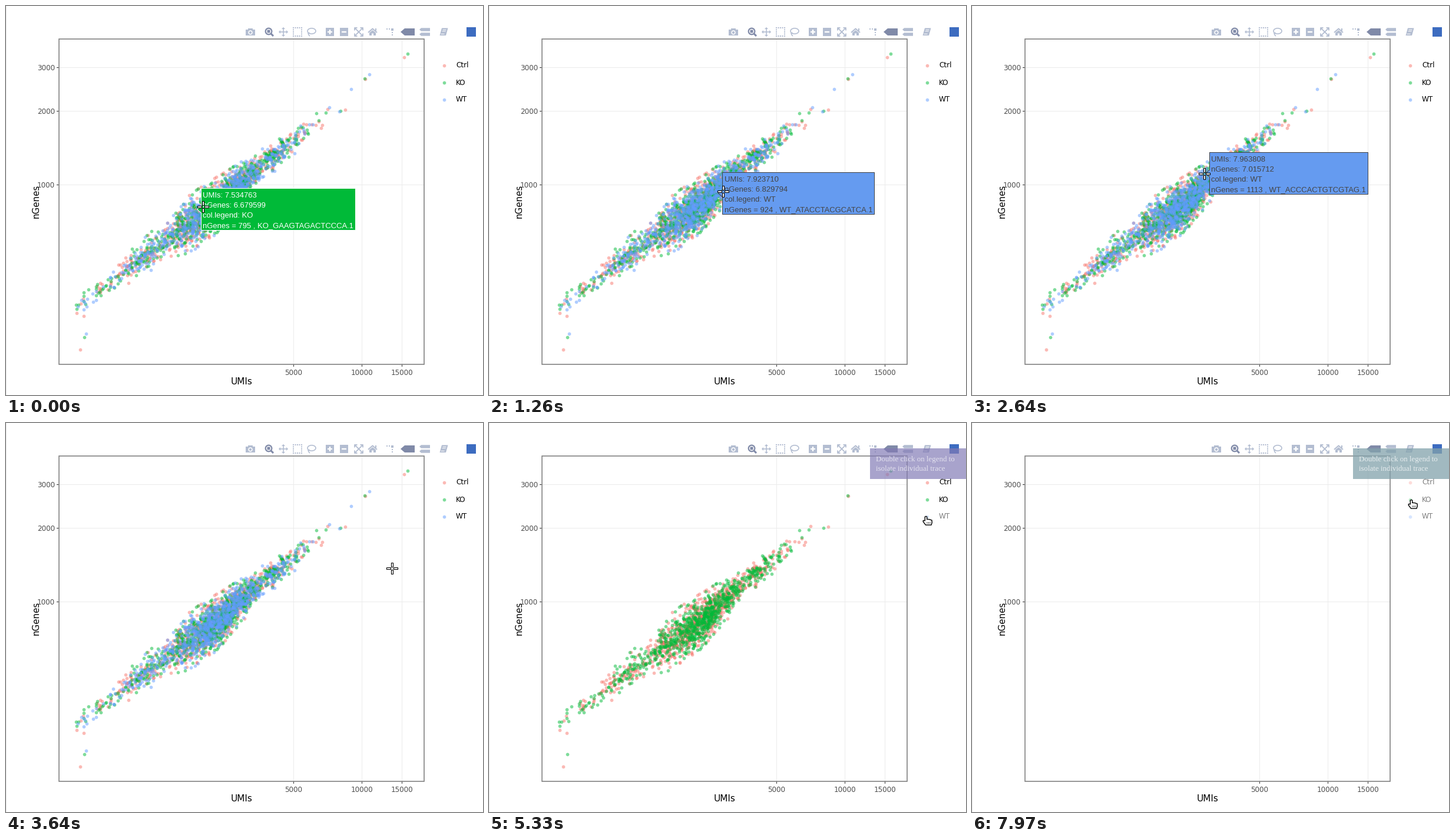
Recreate the animation shown at these times as a matplotlib script. Size 810 by 660 pixels, loop 8 s.

```python
import random

import matplotlib.pyplot as plt
import numpy as np
from matplotlib.animation import FuncAnimation
from matplotlib.patches import Circle, Ellipse, Polygon, Rectangle
from matplotlib.transforms import Affine2D

W, H, DPI = 810, 660, 80
PX = 72 / DPI
STEP, LOOP = 40, 8000
LIGHT, DARK = "#b3bdd1", "#808aa8"
COLORS = {"Ctrl": "#F8766D", "KO": "#00BA38", "WT": "#619CFF"}
HIDE_AT = {"Ctrl": 7250, "KO": 6320, "WT": 4960}

plt.rcParams["path.snap"] = False
fig = plt.figure(figsize=(W / DPI, H / DPI), dpi=DPI, facecolor="white")
ax = fig.add_axes([0, 0, 1, 1])
ax.set_xlim(0, W)
ax.set_ylim(H, 0)
ax.axis("off")


# ---------- drawing helpers (pixel units, y down) ----------
def poly(pts, color, z=3, **kw):
    return ax.add_patch(Polygon(pts, closed=True, fc=color, zorder=z, **{"lw": 0, **kw}))


def box(x, y, w, h, color, z=3, **kw):
    return ax.add_patch(Rectangle((x, y), w, h, fc=color, zorder=z, **{"lw": 0, **kw}))


def disc(x, y, r, color, **kw):
    return ax.add_patch(Circle((x, y), r, fc=color, zorder=3, **{"lw": 0, **kw}))


def stroke(pts, color, w=1, z=3, **kw):
    x, y = zip(*pts)
    return ax.plot(x, y, color=color, lw=w * PX, zorder=z, solid_capstyle="butt", **kw)[0]


def label(x, y, s, size, color, font="DejaVu Sans", z=3, **kw):
    return ax.text(x, y, s, fontsize=size * PX, color=color, family=font, zorder=z, **kw)


# ---------- log-log panel ----------
X0, Y0, KX, KY = 488.5, 303.5, 167.4, 180.7


def to_px(umis, genes):
    return X0 + np.log(umis / 5000) * KX, Y0 - np.log(genes / 1000) * KY


def to_counts(x, y):
    return int(5000 * np.exp((x - X0) / KX)), int(1000 * np.exp((Y0 - y) / KY))


stroke([(0.5, 0), (0.5, H)], "#ececec", z=1)
for n in (5000, 10000, 15000):
    x = np.floor(to_px(n, 1)[0]) + 0.5
    stroke([(x, 56), (x, 608)], "#EBEBEB", z=1)
    stroke([(x, 608), (x, 612)], "#333333")
    label(x, 626, str(n), 12, "#4D4D4D", ha="center")
for n in (1000, 2000, 3000):
    y = np.floor(to_px(1, n)[1]) + 0.5
    stroke([(90, y), (710, y)], "#EBEBEB", z=1)
    stroke([(86, y), (90, y)], "#333333")
    label(83, y + 4.5, str(n), 12, "#4D4D4D", ha="right")
box(90, 56, 620, 552, "none", ec="#7f7f7f", lw=1.6 * PX)
label(400, 642, "UMIs", 15.3, "black", ha="center")
label(56, 331, "nGenes", 15, "black", rotation=90, rotation_mode="anchor", ha="center")

# ---------- points: seeded cloud plus the loners at both ends ----------
LONERS = {
    "Ctrl": [(676, 87), (610, 124), (576, 176), (126, 583)],
    "KO": [(682, 81), (609, 123), (568, 178), (133, 562)],
    "WT": [(617, 116), (586, 141), (566, 179), (136, 556)],
}


def cloud(rng):
    x = np.concatenate([rng.normal(358, 42, 680), rng.normal(235, 40, 105),
                        440 + rng.exponential(33, 70), rng.uniform(118, 160, 9)])
    x = x[(x > 118) & (x < 550)]
    d = x - 355
    trend = 331 - 0.77 * d + 8 * np.exp(-(d / 55) ** 2)
    spread = 9 + 10 * np.exp(-((x - 332) / 85) ** 2)
    return x, trend + spread * np.clip(rng.normal(size=x.size), -2.6, 2.6)


dots, keys, names = {}, {}, {}
rng = np.random.default_rng(11)
dot = dict(ls="", marker="o", ms=5.7 * PX, mew=0)
for i, (name, color) in enumerate(COLORS.items()):
    lx, ly = zip(*LONERS[name])
    cx, cy = cloud(rng)
    dots[name], = ax.plot([*cx, *lx], [*cy, *ly], color=color, alpha=0.5,
                          zorder=2 + i / 10, **dot)
    y = 100.5 + 29 * i
    keys[name], = ax.plot([744], [y], color=color, **dot)
    names[name] = label(764, y + 4, name, 12, "black")


# ---------- toolbar ----------
def toolbar():
    # camera
    box(407, 40, 16, 10, LIGHT)
    box(411, 38, 8, 3, LIGHT)
    disc(415, 45, 3.7, "white")
    disc(415, 45, 2.2, LIGHT)
    # zoom
    disc(446, 43, 5.3, "none", ec=DARK, lw=2.2 * PX)
    stroke([(449.5, 46.5), (454, 51)], DARK, 3)
    box(443.5, 40.5, 5, 5, DARK)
    # pan
    stroke([(464, 44), (478, 44)], LIGHT, 1.6)
    stroke([(471, 37), (471, 51)], LIGHT, 1.6)
    for dx, dy in ((1, 0), (-1, 0), (0, 1), (0, -1)):
        poly([(471 + 8 * dx, 44 + 8 * dy), (471 + 5 * dx + 3 * dy, 44 + 5 * dy + 3 * dx),
              (471 + 5 * dx - 3 * dy, 44 + 5 * dy - 3 * dx)], LIGHT)
    # box select
    for k in range(5):
        a = 3.5 * k
        for x, y in ((0, a), (14, a), (a, 0), (a, 14)):
            box(487 + x, 36 + y, 2, 2, LIGHT)
    # lasso
    ax.add_patch(Ellipse((519, 42.5), 14, 9.5, fc="none", ec=LIGHT, lw=1.6 * PX, zorder=3))
    stroke([(516, 46), (513, 46), (514, 49), (516, 51)], LIGHT, 1.6)
    # zoom in and out
    for x in (543, 567):
        box(x, 37, 14, 14, LIGHT)
        stroke([(x + 3, 44), (x + 11, 44)], "white", 2.4)
    stroke([(550, 40), (550, 48)], "white", 2.4)
    # autoscale
    for s in (-1, 1):
        stroke([(593, 44 - 6 * s), (605, 44 + 6 * s)], LIGHT, 1.8)
        for q in (-1, 1):
            stroke([(599 + 7 * s, 44 + 2.5 * q), (599 + 7 * s, 44 + 7 * q),
                    (599 + 2.5 * s, 44 + 7 * q)], LIGHT, 1.8)
    # home
    stroke([(615, 45), (622.5, 38.5), (630, 45)], LIGHT, 2)
    box(627, 38, 2, 4, LIGHT)
    poly([(617, 45.5), (622.5, 41), (628, 45.5), (628, 50), (617, 50)], LIGHT)
    box(621, 46.5, 3, 3.5, "white")
    # spike lines
    for x, y, s in ((646, 38, 2), (650, 38, 2), (654, 38, 4), (655, 44, 2), (655, 48, 2)):
        box(x, y, s, s, LIGHT)
    # hover modes
    poly([(670, 44), (677, 38), (694, 38), (694, 50), (677, 50)], DARK)
    for y in (40, 48):
        poly([(702, y), (705, y - 2.7), (720, y - 2.7), (720, y + 2.7), (705, y + 2.7)], LIGHT)
    # book
    poly([(740, 37.5), (750.5, 37.5), (747, 50), (736.5, 50)], LIGHT)
    for x, y in ((741.5, 40.5), (740.7, 43), (738.5, 47.5)):
        stroke([(x, y), (x + 6, y)], "white")
    box(782, 36, 16, 16, "#3d6cc0")


toolbar()

# ---------- cursor: each move as start, end, x, y ----------
MOVES = [
    (0, 1, 335, 341), (40, 230, 367, 334), (630, 1430, 407, 310), (1470, 1800, 428, 300),
    (1800, 2110, 400, 291), (2250, 2310, 410, 288), (2600, 2640, 395, 285),
    (2950, 3660, 656, 247), (3660, 3740, 723, 222), (3790, 4110, 742, 158),
    (5480, 5700, 746, 131), (6330, 6470, 746, 105), (6760, 6880, 744, 101),
    (7240, 7450, 746, 112), (7700, 7900, 746, 130),
]


def cursor_at(t):
    pos = np.array(MOVES[0][2:], float)
    for start, end, x, y in MOVES:
        pos += np.clip((t - start) / (end - start), 0, 1) * ((x, y) - pos)
    return np.round(pos)


move = Affine2D()
on_cursor = dict(transform=move + ax.transData)
edge = dict(ec="black", lw=1.1 * PX, **on_cursor)
palm = [(-1.7, 8), (-1.7, 1.2), (0, 0.3), (1.7, 1.2), (1.7, 5.3), (6, 5.6), (10, 7),
        (10.3, 11), (9, 15), (-0.5, 15), (-4.7, 9.5), (-4.7, 7.6), (-3.4, 7.4)]
CURSORS = {
    "cross": [box(x, y, w, h, "white", z=7, **edge) for x, y, w, h in
              ((-9.5, -1.5, 7, 3), (2.5, -1.5, 7, 3), (-1.5, -9.5, 3, 7), (-1.5, 2.5, 3, 7))],
    "arrow": [poly([(0.5, 0.5), (0.5, 16), (4, 12.7), (6.3, 18), (8.6, 17), (6.3, 12),
                    (11, 12)], "white", z=7, **edge)],
    "hand": [poly(palm, "white", z=7, **{**edge, "lw": 1.4 * PX})]
            + [stroke([(x, 10.5), (x, 12.5)], "black", z=7, **on_cursor) for x in (2, 4.5, 7)],
}


def draw_cursor(t):
    x, y = cursor_at(t)
    move.clear().translate(x, y)
    kind = "cross" if x < 710 else "arrow" if t < 4060 else "hand"
    for name, parts in CURSORS.items():
        for a in parts:
            a.set_visible(name == kind)


# ---------- hover label: start, end, trace, UMIs, genes, cell code ----------
CELLS = [
    (0, 40, "KO", 1871, 795, "GAAGTAGACTCCCA"),
    (1240, 1300, "WT", 2761, 924, "ATACCTACGCATCA"),
    (2300, 3000, "WT", 2874, 1113, "ACCCACTGTCGTAG"),
]
tip_move = Affine2D()
on_tip = dict(transform=tip_move + ax.transData)
tip_box = poly([(0, 0), (1, 0), (1, 1)], "white", z=5, lw=PX, **on_tip)
tip_text = [label(10, 17 * k - 20, "", 13, "white", "Liberation Sans", z=5, **on_tip)
            for k in range(4)]


def hovered(t):
    for start, end, *cell in CELLS:
        if start <= t < end:
            return cell
    x, y = cursor_at(t - t % 80)
    umis, genes = to_counts(x - 10, y + 2)
    return "WT", umis, genes, "".join(random.Random(umis).choices("ACGT", k=14))


def draw_hover(t):
    shown = t < 3150
    for a in (tip_box, *tip_text):
        a.set_visible(shown)
    if not shown:
        return
    name, umis, genes, code = hovered(t)
    lines = (f"UMIs: {np.log1p(umis):.6f}", f"nGenes: {np.log1p(genes):.6f}",
             f"col.legend: {name}", f"nGenes = {genes} , {name}_{code}.1")
    ink = "white" if name == "KO" else "#444444"
    x, y = to_px(umis + 1, genes + 1)
    tip_move.clear().translate(round(x) + 0.5, round(y))
    for a, s in zip(tip_text, lines):
        a.set_text(s)
        a.set_color(ink)
    r, h = 13 + round(tip_text[-1].get_window_extent().width), 35.5
    tip_box.set_xy([(0, 0), (7, 6), (7, h), (r, h), (r, -h), (7, -h), (7, -6)])
    tip_box.set_facecolor("#00BA38" if name == "KO" else "#659BF0")
    tip_box.set_edgecolor(ink)


# ---------- notice ----------
note = box(647, 43, 163, 52, "white", z=6)
note_text = [label(657, y, s, 13, "white", "Liberation Serif", z=6)
             for y, s in ((65, "Double click on legend to"), (81, "isolate individual trace"))]
VIOLET, TEAL = np.array([130, 119, 182]) / 255, np.array([131, 162, 172]) / 255


def draw_note(t):
    rise = np.clip((t - 4990) / 700, 0, 1)
    fall = np.clip((t - 7680) / 700, 0, 1)
    alpha = 0.92 * (1 - (1 - rise) ** 2) * (1 - fall ** 2)
    note.set_facecolor(VIOLET + (TEAL - VIOLET) * rise ** 4)
    for a in (note, *note_text):
        a.set_alpha(alpha)


def update(i):
    t = i * STEP + STEP / 2
    for name, end in HIDE_AT.items():
        shown = t < end
        dots[name].set_visible(shown)
        keys[name].set_alpha(0.5 if shown else 0.25)
        names[name].set_alpha(1 if shown else 0.5)
    draw_cursor(t)
    draw_hover(t)
    draw_note(t)
    return []


anim = FuncAnimation(fig, update, frames=LOOP // STEP, interval=STEP, repeat=True)
plt.show()
```
